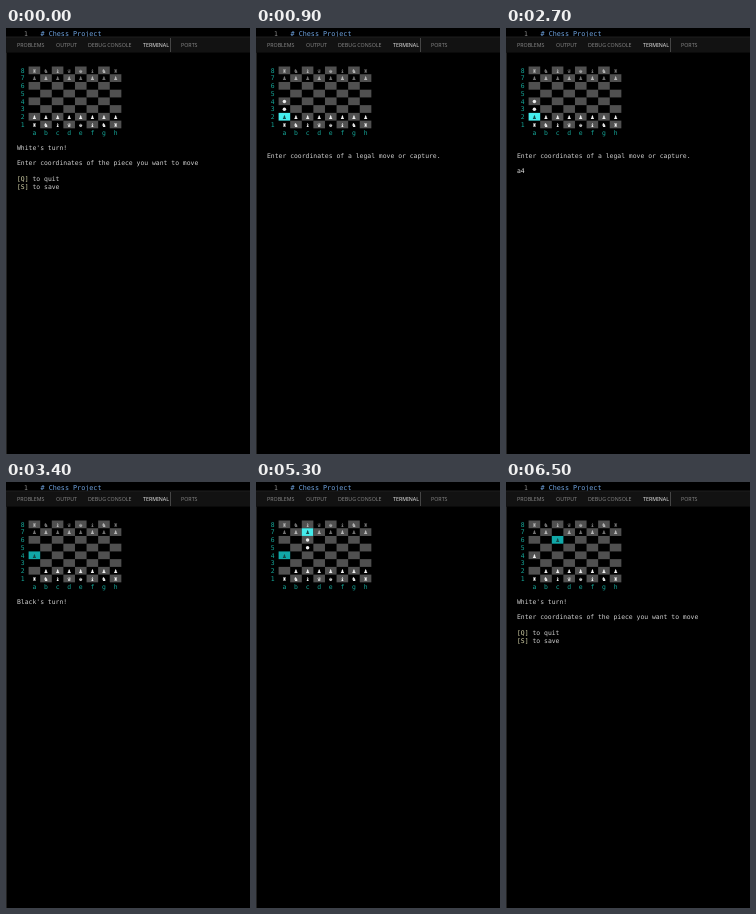
Animation, 244 px wide and 426 px high, one loop 8000 ms. Source, as an HTML page:

```html
<!DOCTYPE html>
<html lang="en">
<head>
<meta charset="utf-8">
<title>Terminal chess</title>
<style>
  html, body { margin: 0; width: 100%; height: 100%; overflow: hidden; background: #000; }
  svg { display: block; width: 100vw; height: 100vh; }
  text { white-space: pre; }
  .mono { font-family: "DejaVu Sans Mono", monospace; font-size: 6.42px; }
  .tab { font-family: "Noto Sans", sans-serif; font-size: 5.3px; fill: #858585; }
  .mid { text-anchor: middle; }
</style>
</head>
<body>
<svg id="stage" viewBox="0 0 244 426" preserveAspectRatio="none"></svg>
<script>
const LOOP = 8000;
const LEFT = 11, CHAR = 3.865, LINE = 7.73, TOP = 38.5;
const CELL = CHAR * 3, BOARD_X = LEFT + CHAR * 3;
const LIGHT = '#505050', BRIGHT = '#45ecec', TEAL = '#11a8a8';
const LABEL = '#14a698', TEXT = '#d0d0d0', KEY = '#d8d6ac';
const FILES = 'abcdefgh';
const BACK = '♜♞♝♛♚♝♞♜';

const stage = document.getElementById('stage');

function add(parent, tag, attrs, content) {
  const el = document.createElementNS('http://www.w3.org/2000/svg', tag);
  for (const key in attrs) el.setAttribute(key, attrs[key]);
  if (content !== undefined) el.textContent = content;
  parent.append(el);
  return el;
}

const rect = (parent, x, y, width, height, fill) =>
  add(parent, 'rect', { x, y, width, height, fill });

const baseline = line => TOP + LINE * (line + 0.5) + 2.3;

const write = (parent, col, line, str, fill = TEXT) =>
  add(parent, 'text', { class: 'mono', x: LEFT + col * CHAR, y: baseline(line), fill }, str);

function drawWindow() {
  rect(stage, 0, 0, 244, 426, '#000');
  add(stage, 'text', { class: 'mono', x: 18, y: 8, fill: '#8a8a8a' }, '1');
  add(stage, 'text', { class: 'mono', x: 34.5, y: 8, fill: '#6ea3e0', style: 'font-size:6.75px' }, '# Chess Project');
  rect(stage, 0, 8.7, 244, 15.9, '#121212');
  rect(stage, 0, 8.7, 244, 0.6, '#262626');
  const tabs = [[11, 'PROBLEMS'], [50, 'OUTPUT'], [82, 'DEBUG CONSOLE'], [137, 'TERMINAL'], [175, 'PORTS']];
  for (const [x, name] of tabs) {
    const el = add(stage, 'text', { class: 'tab', x, y: 18.6 }, name);
    if (name === 'TERMINAL') el.style.fill = '#e2e2e2';
  }
  rect(stage, 164, 10, 0.6, 14, '#686868');
  rect(stage, 0, 24.6, 0.8, 402, '#2a2a2a');
}

function drawBoard(parent, { moves = [], marks = {}, dots = [] }) {
  const pieces = {};
  [...FILES].forEach((f, i) => {
    pieces[f + 8] = [BACK[i], false];
    pieces[f + 7] = ['♟', false];
    pieces[f + 2] = ['♟', true];
    pieces[f + 1] = [BACK[i], true];
  });
  for (const [from, to] of moves) {
    pieces[to] = pieces[from];
    delete pieces[from];
  }

  for (let row = 0; row < 8; row++) {
    const rank = 8 - row, y = TOP + row * LINE;
    write(parent, 1, row, rank, LABEL);
    for (let col = 0; col < 8; col++) {
      const square = FILES[col] + rank, x = BOARD_X + col * CELL;
      const light = (row + col) % 2 === 0, mark = marks[square];
      if (light || mark) rect(parent, x, y, CELL, LINE, mark || LIGHT);
      if (dots.includes(square))
        add(parent, 'circle', { cx: x + CELL / 2, cy: y + LINE / 2 + 0.2, r: 1.75, fill: '#eee' });
      if (!pieces[square]) continue;
      const [glyph, white] = pieces[square];
      const fill = mark ? '#164848' : white ? '#f2f2f2' : light ? '#b8b8b8' : '#747474';
      add(parent, 'text', { class: 'mono mid', x: x + CELL / 2, y: baseline(row), fill }, glyph);
    }
  }
  [...FILES].forEach((f, i) => write(parent, 4 + i * 3, 8, f, LABEL));
}

function drawPrompt(parent) {
  write(parent, 0, 10, "White's turn!");
  write(parent, 0, 12, 'Enter coordinates of the piece you want to move');
  ['[Q] to quit', '[S] to save'].forEach((str, i) => {
    write(parent, 0, 14 + i, str.slice(0, 3), KEY);
    write(parent, 4, 14 + i, str.slice(4));
  });
}

const whiteMove = ['a2', 'a4'], blackMove = ['c7', 'c6'];

// Each screen: start time, board state, message drawing, typed keys as [time, char].
const screens = [
  { at: 0, board: {}, message: drawPrompt, inputLine: 17, keys: [[100, 'a'], [500, '2']] },
  {
    at: 900,
    board: { marks: { a2: BRIGHT }, dots: ['a3', 'a4'] },
    message: g => write(g, 0, 11, 'Enter coordinates of a legal move or capture.'),
    inputLine: 13, keys: [[1900, 'a'], [2500, '4']]
  },
  {
    at: 3300,
    board: { moves: [whiteMove], marks: { a4: TEAL } },
    message: g => write(g, 0, 10, "Black's turn!")
  },
  {
    at: 4800,
    board: { moves: [whiteMove], marks: { a4: TEAL, c7: BRIGHT }, dots: ['c6', 'c5'] }
  },
  { at: 6300, board: { moves: [whiteMove, blackMove], marks: { c6: TEAL } }, message: drawPrompt }
];

drawWindow();
for (const s of screens) {
  s.group = add(stage, 'g', {});
  drawBoard(s.group, s.board);
  if (s.message) s.message(s.group);
  if (s.keys) s.input = write(s.group, 0, s.inputLine, '', '#e0e0e0');
}

function render(t) {
  const current = screens.filter(s => s.at <= t).pop();
  for (const s of screens) s.group.setAttribute('display', s === current ? 'inline' : 'none');
  if (current.input)
    current.input.textContent = current.keys.filter(([at]) => at <= t).map(([, ch]) => ch).join('');
}

const start = performance.now();
function tick() {
  render((performance.now() - start) % LOOP);
  requestAnimationFrame(tick);
}
tick();
</script>
</body>
</html>
```
